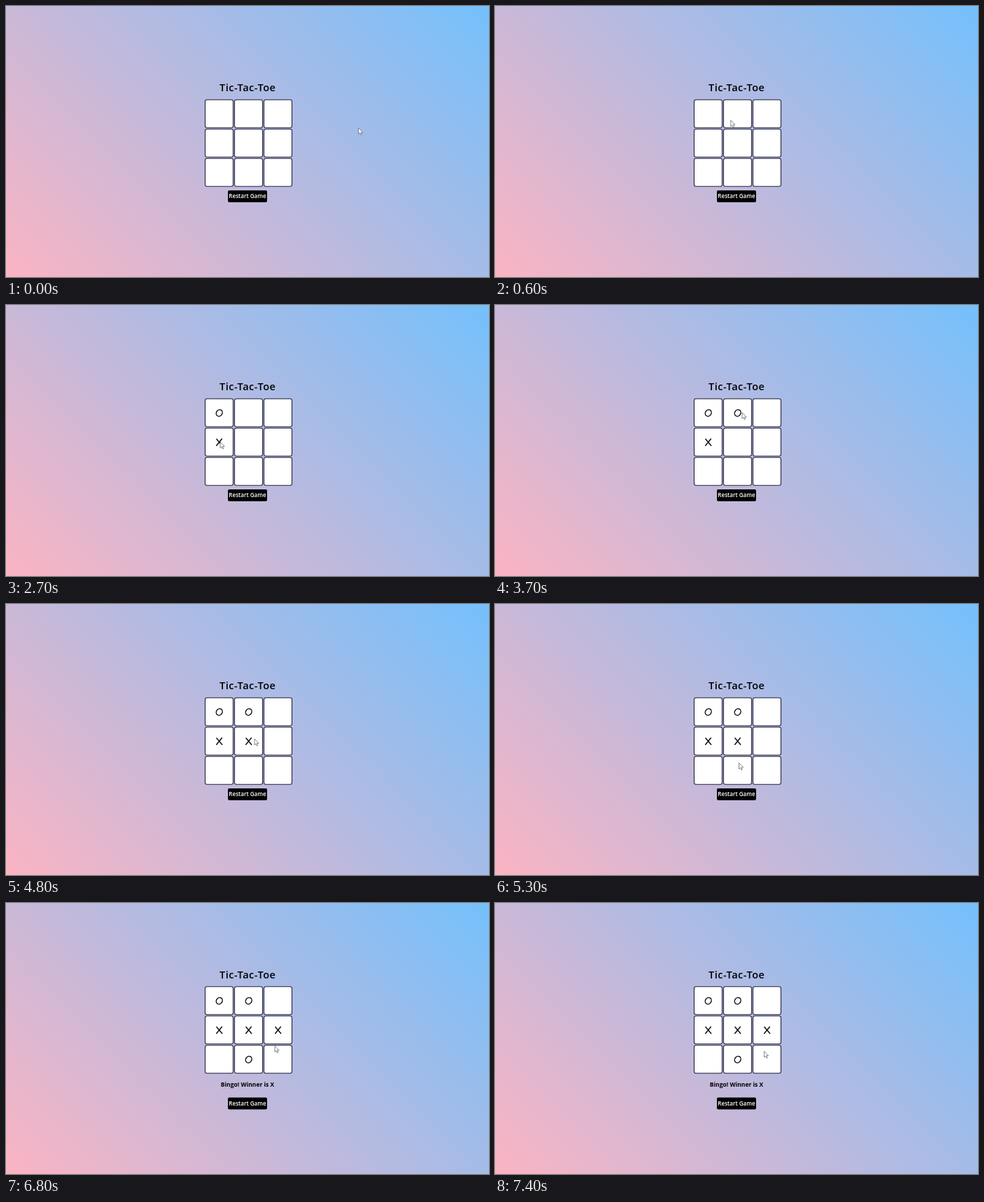
An HTML page for the animation above (8 s loop, 690x388 px).

```html
<!DOCTYPE html>
<html lang="en">
<head>
<meta charset="utf-8">
<title>Tic-Tac-Toe</title>
<style>
  html, body { margin: 0; width: 100%; height: 100%; overflow: hidden; }
  body { background: linear-gradient(45deg, #fbb4c3, #74c0fc); }
  svg { display: block; width: 690px; height: 388px; }
  text { font-family: "Open Sans", sans-serif; text-anchor: middle; }
  .title { font-size: 14.6px; font-weight: 600; letter-spacing: .5px; }
  .note { font-size: 8.5px; font-weight: 700; }
  .label { font-size: 8.1px; font-weight: 600; fill: #fff; }
  .cell { fill: #fff; stroke: #20223a; stroke-width: 1.1; }
  .mark { fill: none; stroke: #0c0c0c; stroke-width: 1.45; stroke-linecap: round; }
  .cursor { fill: #fff; stroke: #62626c; stroke-width: .75; stroke-linejoin: round; }
</style>
</head>
<body>
<svg viewBox="0 0 690 388">
  <g id="board">
    <text class="title" x="345.2" y="122">Tic-Tac-Toe</text>
  </g>
  <text id="note" class="note" x="345" y="262.5">Bingo! Winner is X</text>
  <g id="button">
    <rect x="317" y="264" width="56" height="17" rx="2"/>
    <text class="label" x="345" y="275.4">Restart Game</text>
  </g>
  <path id="cursor" class="cursor" d="M.5 .5V9.3L2.5 7.5L3.9 10.6L5.3 10L3.9 7H6.7Z"/>
</svg>
<script>
const LOOP = 8000, STEP = 100, WIN = 6800, SHIFT = 14.5;
const PITCH = 42, LEFT = 284.5, TOP = 134.2, SIZE = 40;
const $ = id => document.getElementById(id);
const board = $('board'), note = $('note'), button = $('button'), cursor = $('cursor');

// Players alternate, O first: click time and cell index
const clicks = [[1500, 0], [2700, 3], [3700, 1], [4800, 4], [5800, 7], [WIN, 5]];

// Pointer trips: start time, end time, x, y
const home = [503, 174];
const trips = [
  [0, 1200, 312.5, 161.5],
  [1800, 2200, 305.5, 195.5],
  [2800, 3400, 352.5, 153.5],
  [3900, 4200, 354.5, 192.5],
  [4900, 5300, 348, 227],
  [5900, 6200, 383.5, 204],
  [6800, 7100, 367.5, 102.5],
  [7200, 7400, 384, 211.5]
];

function add(tag, attrs) {
  const el = document.createElementNS('http://www.w3.org/2000/svg', tag);
  for (const key in attrs) el.setAttribute(key, attrs[key]);
  return board.appendChild(el);
}

const corner = cell => [LEFT + cell % 3 * PITCH, TOP + Math.floor(cell / 3) * PITCH];

for (let cell = 0; cell < 9; cell++) {
  const [x, y] = corner(cell);
  add('rect', { class: 'cell', x, y, width: SIZE, height: SIZE, rx: 2.5 });
}

const marks = clicks.map(([time, cell], i) => {
  const [x, y] = corner(cell);
  const at = `translate(${x + SIZE / 2 + .2} ${y + SIZE / 2 + .4})`;
  const el = i % 2
    ? add('path', { class: 'mark', d: 'M-3.8 -4.6L4 4.7M3.7 -4.8L-4 4.7', transform: at })
    : add('ellipse', { class: 'mark', rx: 4.2, ry: 4.9, transform: at + ' rotate(32)' });
  return { time, el };
});

const show = (el, on) => el.setAttribute('visibility', on ? 'visible' : 'hidden');
const place = (el, x, y) => el.setAttribute('transform', `translate(${x} ${y})`);

function progress(t, from, to) {
  const u = Math.min(1, Math.max(0, (t - from) / (to - from)));
  return 1 - (1 - u) ** 3;
}

function pointAt(t) {
  return trips.reduce(([px, py], [from, to, x, y]) => {
    const e = progress(t, from, to);
    return [px + (x - px) * e, py + (y - py) * e];
  }, home);
}

function draw(now) {
  const t = Math.floor(now % LOOP / STEP) * STEP;
  const won = t >= WIN;
  marks.forEach(m => show(m.el, t >= m.time));
  show(note, won);
  place(board, 0, won ? -SHIFT : 0);
  place(button, 0, won ? SHIFT : 0);
  place(cursor, ...pointAt(t));
}

const start = performance.now();
function tick() {
  draw(performance.now() - start);
  requestAnimationFrame(tick);
}
tick();
</script>
</body>
</html>
```
